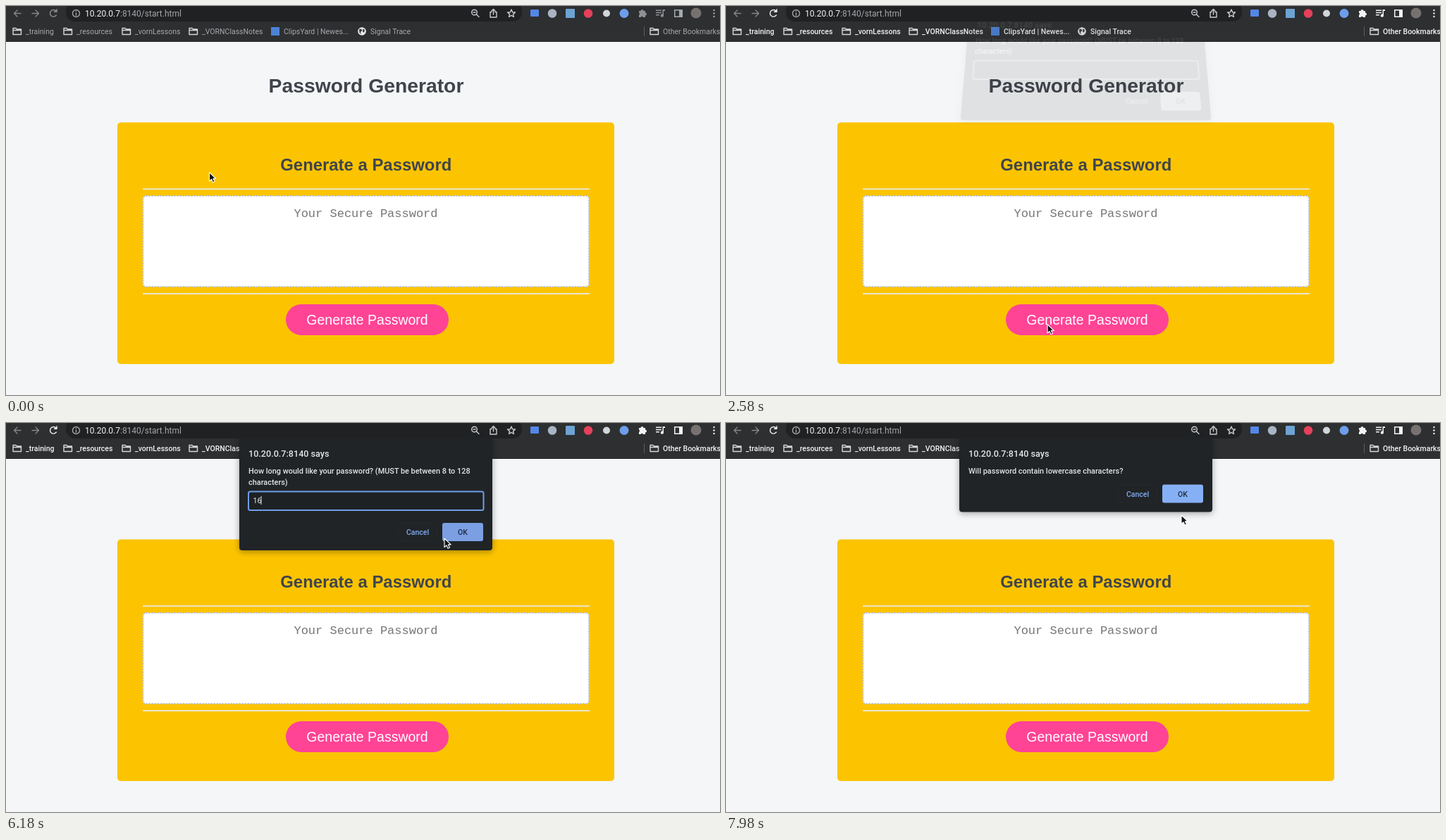
An HTML page that plays this animation: 1013 by 553 pixels, repeating every 8 s.

```html
<!DOCTYPE html>
<html lang="en">
<head>
<meta charset="utf-8">
<title>Password Generator</title>
<style>
  html, body { margin: 0; width: 100%; height: 100%; overflow: hidden; background: #f4f6f8; }
  svg { position: absolute; left: 0; top: 0; display: block; }
  #clip { position: absolute; left: 0; top: 22px; width: 1013px; height: 531px; overflow: hidden; }
  #dialog { top: -22px; }
  text { font-family: Roboto, sans-serif; white-space: pre; }
  .page { font-family: "Liberation Sans", Arial, sans-serif; }
  .mono { font-family: "Liberation Mono", "Courier New", monospace; }
  .mid { text-anchor: middle; }
  .line { fill: none; stroke-width: 1.4; stroke-linecap: round; stroke-linejoin: round; }
  .med { font-weight: 500; }
</style>
</head>
<body>
<svg id="page" width="1013" height="553" viewBox="0 0 1013 553">
  <rect width="1013" height="553" fill="#f4f6f8"/>
  <rect width="1013" height="51" fill="#2d2f31"/>
  <rect y="50" width="1013" height="1" fill="#222426"/>
  <rect x="85" y="-6" width="647" height="28" rx="13" fill="#1f2123"/>

  <g class="line" stroke="#85888b">
    <path d="M21 10.500H11.500M16 6L11.500 10.500L16 15"/>
    <path d="M37 10.500H46.500M42 6L46.500 10.500L42 15"/>
  </g>
  <path id="reload" class="line" d="M71.300 13A4.800 4.800 0 1 1 71 7.300M72 4.800V8.300H68.500"/>
  <g class="line" stroke="#a4a7aa" stroke-width="1.100">
    <circle cx="99.500" cy="10.500" r="5"/><path d="M99.500 10V13.300M99.500 7.700V7.800"/>
  </g>
  <text x="112" y="14.500" font-size="12" fill="#a4a7aa"><tspan fill="#f1f3f4">10.20.0.7</tspan>:8140/start.html</text>

  <g class="line" stroke="#c9cccf">
    <circle cx="664.500" cy="9" r="3.800"/><path d="M667.500 12L671 15.500M663 9H666"/>
    <path d="M689 8.500H687V16H696V8.500H694M691.500 12V4.500M689 7L691.500 4.500L694 7"/>
    <path d="M717 5L718.600 8.700L722.500 9L719.500 11.600L720.400 15.500L717 13.400L713.600 15.500L714.500 11.600L711.500 9L715.400 8.700Z"/>
  </g>
  <rect x="744" y="5" width="12" height="10" rx="1" fill="#5487e8"/>
  <circle cx="775" cy="10.500" r="6.300" fill="#a9b4c4"/>
  <rect x="794" y="4" width="13" height="13" rx="1" fill="#6da3d3"/>
  <circle cx="826" cy="10.500" r="6.300" fill="#e6405a"/>
  <circle cx="852" cy="10.500" r="5" fill="#d3d6d8"/>
  <circle cx="877" cy="10.500" r="6.500" fill="#6c9eea"/>
  <g id="tools">
    <path d="M898 7H900.500A2 2 0 1 1 904.500 7H907V9.500A2 2 0 1 1 907 13.500V16H903.800A1.700 1.700 0 0 0 900.600 16H898V12.700A1.700 1.700 0 0 0 898 9.600Z"/>
    <path d="M922 5.500H930V7H922ZM922 8.700H930V10.200H922ZM922 12H927V13.500H922ZM931.500 5H935V7H933V13.500A2.100 2.100 0 1 1 931.500 11.600Z"/>
  </g>
  <g id="panel">
    <path fill-rule="evenodd" d="M948 5H960V16H948ZM949.500 6.500V14.500H955V6.500Z"/>
    <circle cx="1004.500" cy="6" r="1.200"/><circle cx="1004.500" cy="10.500" r="1.200"/><circle cx="1004.500" cy="15" r="1.200"/>
  </g>
  <circle cx="979" cy="10" r="7.500" fill="#77716f"/>
  <g id="marks" font-size="10.500"></g>
  <rect x="376" y="30" width="12" height="12" fill="#4c82d6"/>
  <circle cx="505" cy="36" r="5.800" fill="#eceeef"/>
  <path d="M501 33L504 32.500L505.500 35L503 37L504 40L501.500 38ZM506.500 32L509 34L508 38L506 36.500Z" fill="#3b3e40"/>
  <path d="M905.500 29V43" stroke="#5b5e61"/>

  <text class="page mid" x="511" y="122.500" font-size="28.300" font-weight="700" fill="#40444b">Password Generator</text>
  <rect x="158" y="165.500" width="705" height="343.500" rx="5" fill="#fcc400"/>
  <text class="page mid" x="510.800" y="233.500" font-size="23.900" font-weight="700" fill="#40444b">Generate a Password</text>
  <path d="M194 260.300H828M194 409H828" stroke="#ece6cf" stroke-width="2"/>
  <rect x="194.500" y="270" width="632.500" height="129" rx="4" fill="#fff" stroke="#b9c2dc" stroke-width="2" stroke-dasharray="2 2"/>
  <text class="mono mid" x="510.500" y="300" font-size="17" fill="#757575">Your Secure Password</text>
  <rect x="397" y="424" width="231" height="44" rx="22" fill="#ff4395"/>
  <text class="page mid" x="512.500" y="453" font-size="19.500" fill="#fff">Generate Password</text>
</svg>

<div id="clip">
  <svg id="dialog" width="1013" height="553" viewBox="0 0 1013 553">
    <rect id="box" x="331" y="18" width="359" rx="4" fill="#202427" style="filter:drop-shadow(0 2px 5px rgba(0,0,0,.35))"/>
    <text class="med" x="344" y="48" font-size="12.600" fill="#e3e5e7">10.20.0.7:8140 says</text>
    <g class="med" font-size="10.900" fill="#e3e5e7">
      <text id="msg1" x="344" y="71.500"></text>
      <text id="msg2" x="344" y="87.500">characters)</text>
    </g>
    <g id="field">
      <rect x="344" y="97.500" width="333.500" height="26.500" rx="2.500" fill="#1d2123" stroke="#6f9de6" stroke-width="2"/>
      <text id="typed" x="350.500" y="114.300" font-size="10.700" fill="#e8eaed"></text>
      <path id="caret" d="M0 104V116" stroke="#e8eaed"/>
    </g>
    <g id="buttons" class="med mid" font-size="10.500">
      <rect x="556" y="142.500" width="56" height="25" rx="3" fill="none" stroke="#25292c"/>
      <text x="584" y="159" fill="#82abef">Cancel</text>
      <rect id="ok" x="619" y="142" width="58" height="26" rx="3"/>
      <text id="okText" x="648" y="159">OK</text>
    </g>
  </svg>
</div>

<svg id="pointer" width="1013" height="553" viewBox="0 0 1013 553">
  <path id="arrow" d="M0 0V12.500L3 9.800L5 14.200L7.400 13.100L5.400 8.900H9.200Z" fill="#111" stroke="#fff" stroke-width="1.100" stroke-linejoin="round"/>
  <path id="hand" d="M-1 1.200Q0 -.500 1.200 1L2 5.500Q3.300 4.500 4 6Q5.500 5.300 6 6.600Q7.300 6 7.500 8V11L6 14.500H0L-3.700 9.500Q-3.800 7.800 -2 8.500L-.400 10Z" fill="#fff" stroke="#222" stroke-width="1.100" stroke-linejoin="round"/>
  <g id="beam" fill="none" stroke-linecap="round">
    <path d="M-3 -6.500Q0 -6.500 0 -4V4Q0 6.500 -3 6.500M3 -6.500Q0 -6.500 0 -4M0 4Q0 6.500 3 6.500M-1.500 1H1.500" stroke="#777" stroke-width="2.600"/>
    <path d="M-3 -6.500Q0 -6.500 0 -4V4Q0 6.500 -3 6.500M3 -6.500Q0 -6.500 0 -4M0 4Q0 6.500 3 6.500M-1.500 1H1.500" stroke="#f4f4f4" stroke-width="1.100"/>
  </g>
</svg>

<script>
const LOOP = 8000;
const $ = id => document.getElementById(id);
const set = (id, attrs) => { for (const k in attrs) $(id).setAttribute(k, attrs[k]); };
const show = (id, on) => { $(id).style.display = on ? '' : 'none'; };
const clamp = v => Math.max(0, Math.min(1, v));
const ramp = (t, a, b) => clamp((t - a) / (b - a));
const ease = v => v * v * (3 - 2 * v);

// label, text x, folder x (optional)
const bookmarks = [
  ['_training', 28, 9], ['_resources', 100, 81], ['_vornLessons', 183, 164],
  ['_VORNClassNotes', 278, 259], ['ClipsYard | Newes...', 394],
  ['Signal Trace', 517], ['Other Bookmarks', 932, 913]
];
$('marks').innerHTML = bookmarks.map(([label, x, folder]) =>
  `<text x="${x}" y="39.500">${label}</text>` + (folder === undefined ? '' :
  `<path transform="translate(${folder} 30)" class="line" stroke="#d5d7d9" d="M1 10.500V1.500H5L6.500 3H12.500V10.500ZM1 4.500H12.500"/>`)
).join('');

// time, x, y of the pointer's hot spot
const path = [
  [0, 288.500, 236.500], [900, 288.500, 236.500], [1640, 456, 452.500], [2640, 456, 452.500],
  [3200, 490.500, 161], [3420, 490.500, 161], [3960, 489, 116.500], [5640, 489, 116.500],
  [6180, 622, 164], [6540, 644.500, 157.500], [7740, 644.500, 157.500], [7960, 646, 131]
];

function pointerAt(t) {
  let i = path.length - 1;
  while (path[i][0] > t) i--;
  const a = path[i], b = path[i + 1] || a;
  const k = a === b ? 0 : ease(ramp(t, a[0], b[0]));
  return [a[1] + (b[1] - a[1]) * k, a[2] + (b[2] - a[2]) * k];
}

const inside = (x, y, l, t, r, b) => x >= l && x <= r && y >= t && y <= b;

function drawToolbar(t) {
  const lit = t >= 1740, grey = '#8e9194', white = '#f1f3f4';
  set('tools', { fill: t >= 1680 ? white : grey });
  set('panel', { fill: lit ? white : '#a6a9ac' });
  set('reload', { stroke: lit ? white : grey });
  set('marks', { fill: lit ? white : '#a6a9ac', 'font-weight': lit ? 500 : 400 });
}

function drawDialog(t, x, y) {
  const confirm = t >= 7700;
  const closing = !confirm && t >= 6930;
  const p = confirm ? ramp(t, 7720, 7920)
    : closing ? 1 - ramp(t, 6930, 7110) : ramp(t, 2560, 2760);
  show('dialog', p > 0);
  if (!p) return 0;

  const bottom = confirm ? 126.500 : 181, q = 1 - p, style = $('dialog').style;
  style.opacity = p;
  style.transformOrigin = `510.500px ${bottom}px`;
  style.transform = q ? `translateY(${-21 * q}px) perspective(500px) rotateX(${15 * q}deg) scale(${1 - .01 * q},${1 + .09 * q})` : 'none';
  style.filter = q ? 'grayscale(1)' : 'none';

  set('box', { height: bottom - 18 });
  $('msg1').textContent = confirm ? 'Will password contain lowercase characters?'
    : 'How long would like your password? (MUST be between 8 to 128';
  show('msg2', !confirm);
  show('field', !confirm);
  set('buttons', { transform: `translate(0 ${confirm ? -54.500 : 0})` });

  const hover = !confirm && inside(x, y, 619, 142, 677, 168);
  set('ok', { fill: closing ? '#6b6e71' : hover ? '#7b9fe2' : '#86b0f6' });
  set('okText', { fill: closing ? '#8f9295' : '#202c40' });

  const typed = t < 4980 ? '' : t < 5160 ? '1' : '16';
  $('typed').textContent = typed;
  set('caret', { transform: `translate(${typed.length === 1 ? 356.500 : 362} 0)` });
  show('caret', typed && t < 6480);
  return p;
}

function draw(t) {
  const [x, y] = pointerAt(t);
  drawToolbar(t);
  const open = drawDialog(t, x, y);
  const kind = !open && inside(x, y, 397, 424, 628, 468) ? 'hand'
    : open && t < 6900 && inside(x, y, 344, 97, 678, 124) ? 'beam' : 'arrow';
  for (const id of ['arrow', 'hand', 'beam']) {
    show(id, id === kind && !(t >= 5160 && t < 5640));
    set(id, { transform: `translate(${x} ${y})` });
  }
}

const start = performance.now();
function tick() {
  draw((performance.now() - start) % LOOP);
  requestAnimationFrame(tick);
}
tick();
</script>
</body>
</html>
```
